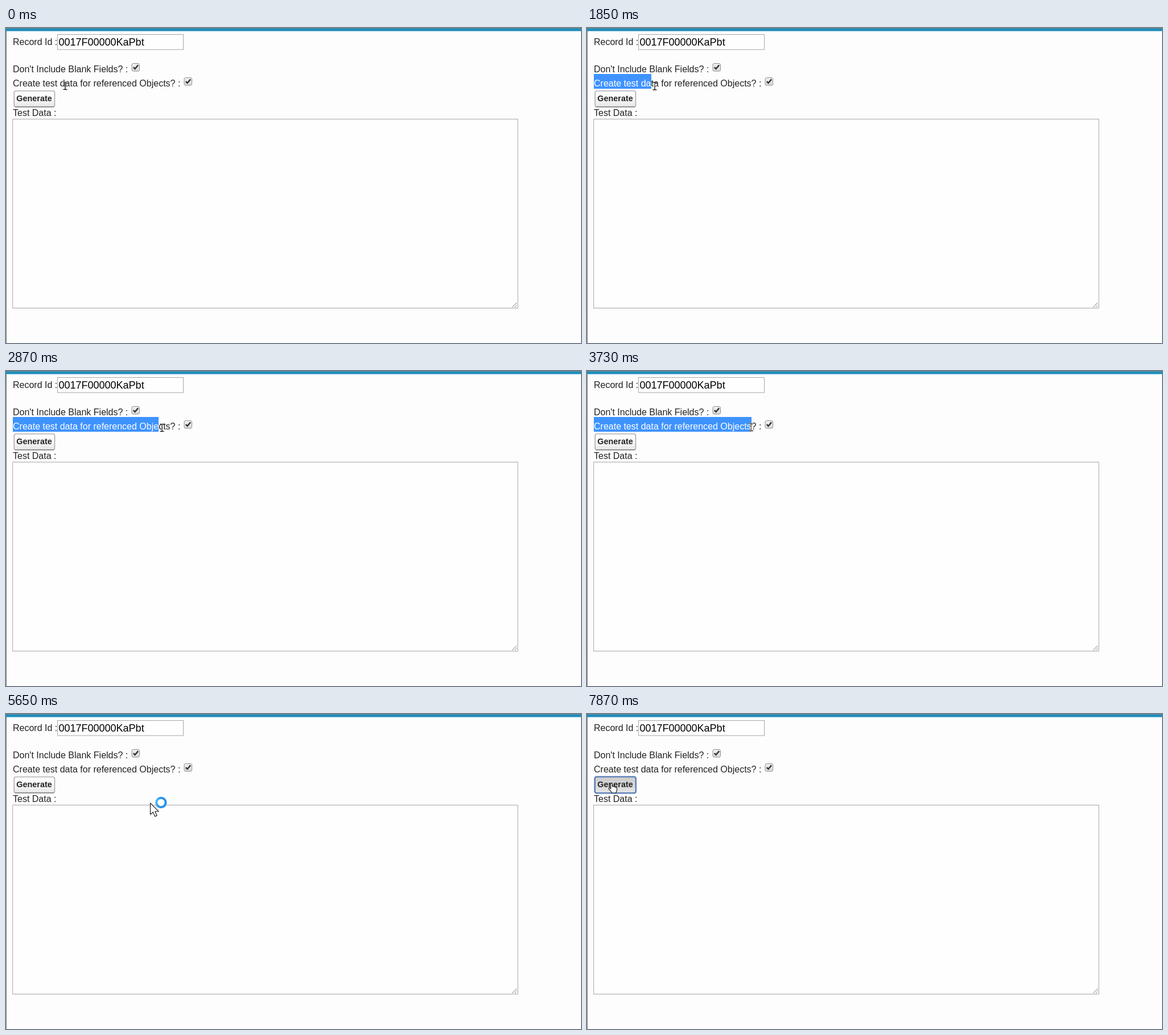
Write an HTML page that moves like this. It is 1010x555 px and loops after 7990 ms.

```html
<!DOCTYPE html>
<html lang="en">
<head>
<meta charset="utf-8">
<title>Test data generator</title>
<style>
  html, body { margin: 0; width: 100%; height: 100%; overflow: hidden; background: #fdfdfd; }
  svg { display: block; width: 1010px; height: 555px; }
  text { font: 16px Arial, "Liberation Sans", sans-serif; fill: #222; white-space: pre; }
  .value { font-size: 18px; fill: #000; }
  .caption { font-size: 14.4px; font-weight: bold; fill: #222; }
  .box { fill: #fefefe; stroke: #a6a6a6; }
  .pointer { fill: #fff; stroke: #111; stroke-width: 1.1; stroke-linejoin: round; }
  #beam { fill: none; stroke: #fff; stroke-width: 1.25; mix-blend-mode: difference; }
</style>
</head>
<body>
<svg viewBox="0 0 1010 555">
  <defs>
    <linearGradient id="normal" x2="0" y2="1">
      <stop stop-color="#fff"/><stop offset=".5" stop-color="#f8f8f8"/><stop offset="1" stop-color="#e6e6e8"/>
    </linearGradient>
    <linearGradient id="hover" x2="0" y2="1">
      <stop stop-color="#f4f4f5"/><stop offset="1" stop-color="#e2e2e4"/>
    </linearGradient>
    <linearGradient id="pressed" x2="0" y2="1">
      <stop stop-color="#cbcbcd"/><stop offset="1" stop-color="#e4e4e6"/>
    </linearGradient>
    <linearGradient id="tick" x2="0" y2="1">
      <stop stop-color="#f2f2f2"/><stop offset="1" stop-color="#d9d9d9"/>
    </linearGradient>
    <linearGradient id="busy" x2="1" y2=".3">
      <stop stop-color="#55c0f8"/><stop offset=".45" stop-color="#2a95f0"/><stop offset="1" stop-color="#2490ee"/>
    </linearGradient>
    <clipPath id="chosen"><rect class="marked" x="12" y="81" height="26"/></clipPath>
    <g id="checkbox">
      <rect x=".5" y=".5" width="13.5" height="13.5" rx="2.5" fill="url(#tick)" stroke="#8e8e8e"/>
      <path d="M3.3 7.2 6 10 11.6 3.4" fill="none" stroke="#333" stroke-width="2.5"/>
    </g>
  </defs>

  <rect width="1010" height="555" fill="#fdfdfd"/>
  <rect width="1" height="555" fill="#777"/>
  <rect width="1010" height="5.5" fill="#1f8ebb"/>
  <rect width="1010" height="1" fill="#6b8792"/>

  <text x="12" y="30">Record Id :</text>
  <rect class="box" x="90.5" y="11.5" width="221" height="26.5"/>
  <text class="value" x="92.5" y="30.5">0017F00000KaPbt</text>

  <text x="12" y="78">Don't Include Blank Fields? :</text>
  <use href="#checkbox" x="220.5" y="62"/>
  <text id="label" x="12" y="103">Create test data for referenced Objects? :</text>
  <rect class="marked" x="12" y="81" height="26" fill="#3f93ff"/>
  <text x="12" y="103" clip-path="url(#chosen)" style="fill:#fff">Create test data for referenced Objects? :</text>
  <use href="#checkbox" x="312.5" y="87"/>

  <rect id="halo" x="13.2" y="110.2" width="73" height="29.6" rx="3.5" fill="none" stroke="#8fb2e6" stroke-width="2.4"/>
  <rect id="button" x="14.2" y="110.9" width="71.3" height="28" rx="3" stroke-width="1.4"/>
  <path id="edge" d="M16 139H84" stroke="#858585" stroke-width="1.4"/>
  <text class="caption" x="18.3" y="129.3">Generate</text>

  <text x="12" y="155">Test Data :</text>
  <rect class="box" x="11.7" y="160.5" width="887.3" height="333"/>
  <path d="M889 492 897 484M893.5 492 897 488.5" stroke="#777"/>

  <path id="beam" d="M-3.5-6.4H3.5M0-6.4V6.4M-3.5 6.4H3.5"/>
  <g id="arrow">
    <path class="pointer" d="M.5.5V20.6L5.2 16.3 8.7 24 12.2 22.4 8.8 15.2H15.1Z"/>
    <circle cx="19.3" cy="-.5" r="8.2" fill="#fdfdfd" stroke="url(#busy)" stroke-width="4"/>
  </g>
  <path id="hand" class="pointer" d="M4.5 11V2.2C4.5.2 7.3.2 7.3 2.2V7C7.8 5.9 9.8 6.1 10 7.5 10.8 6.6 12.4 7 12.6 8.3 13.4 7.6 15.2 8 15.2 9.7V13C15.2 15 13.6 16 13.6 18H6.2C6 15.5 2.5 13.5 1 10.8 .2 9 2.4 8.3 3.4 9.7Z"/>
</svg>
<script>
const LOOP = 7990;
// time, cursor, x, y, selected letters, button state
const steps = [
  [0, 'beam', 104, 102],
  [120, 'beam', 89, 99],
  [240, 'beam', 65, 96],
  [360, 'beam', 49.5, 96],
  [510, 'beam', 42, 97],
  [630, 'beam', 30, 98],
  [750, 'beam', 17, 99],
  [880, 'beam', 10.5, 99],
  [1490, 'beam', 14, 100],
  [1610, 'beam', 42, 102, 3],
  [1730, 'beam', 83, 103, 9],
  [1850, 'beam', 119, 102.5, 14],
  [1970, 'beam', 141, 103, 18],
  [2120, 'beam', 167, 103, 23],
  [2270, 'beam', 192, 101, 26],
  [2390, 'beam', 215, 99, 29],
  [2510, 'beam', 236, 99, 32],
  [2630, 'beam', 253, 100, 33],
  [2750, 'beam', 266, 100, 35],
  [2870, 'beam', 274, 100, 36],
  [3020, 'beam', 280, 100, 37],
  [3170, 'beam', 283, 99.5, 38],
  [3290, 'beam', 285, 99, 39],
  [3730, 'beam', 288.5, 99, 39],
  [3880, 'beam', 291, 99, 39],
  [4000, 'beam', 294, 99, 40],
  [4150, 'beam', 297, 99, 40],
  [4280, 'beam', 299, 99, 41],
  [4700, 'arrow', 372, 112, 41],
  [4830, 'arrow', 425, 111, 41],
  [4950, 'arrow', 425, 111],
  [5650, 'arrow', 253, 156.5],
  [5770, 'arrow', 122, 150],
  [5890, 'hand', 55, 135.5, 0, 'hover'],
  [6040, 'hand', 48, 128, 0, 'hover'],
  [6160, 'hand', 41, 123, 0, 'hover'],
  [6290, 'hand', 37.3, 121, 0, 'hover'],
  [7870, 'hand', 37.3, 121, 0, 'pressed']
];

const byId = id => document.getElementById(id);
const cursors = ['beam', 'arrow', 'hand'].map(byId);
const marked = document.querySelectorAll('.marked');
const label = byId('label'), button = byId('button'), halo = byId('halo'), edge = byId('edge');
let current;

function show([, cursor, x, y, letters = 0, state = 'normal']) {
  for (const el of cursors) {
    el.style.display = el.id === cursor ? '' : 'none';
    el.setAttribute('transform', `translate(${x} ${y})`);
  }
  const width = letters ? Math.round(label.getSubStringLength(0, letters)) : 0;
  marked.forEach(el => el.setAttribute('width', width));
  const pressed = state === 'pressed';
  button.setAttribute('fill', `url(#${state})`);
  button.setAttribute('stroke', pressed ? '#45659c' : '#a3a3a3');
  halo.style.display = pressed ? '' : 'none';
  edge.style.display = pressed ? 'none' : '';
}

function tick() {
  const time = performance.now() % LOOP;
  const step = steps.findLast(s => s[0] <= time);
  if (step !== current) show(current = step);
  requestAnimationFrame(tick);
}
tick();
</script>
</body>
</html>
```
